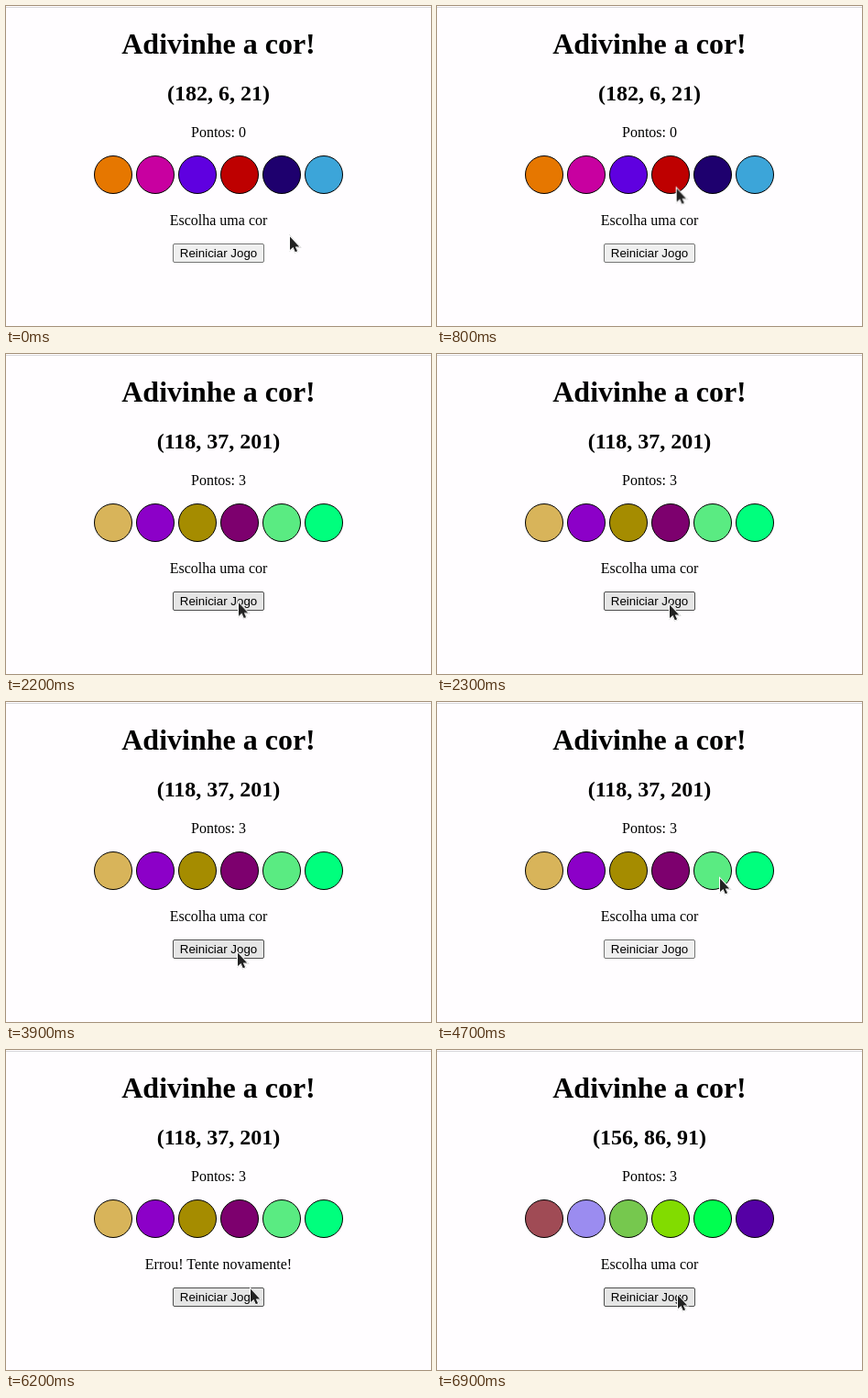
Animation of 464 by 349 pixels, one loop 8 s. Source, as an HTML page:

```html
<!DOCTYPE html>
<html lang="pt-BR">
<head>
<meta charset="utf-8">
<title>Adivinhe a cor!</title>
<style>
html, body { margin: 0; width: 100%; height: 100%; overflow: hidden; background: #fffdff; }
#stage {
  position: relative; width: 464px; height: 349px; overflow: hidden;
  font: 16px/17px "Liberation Serif", "Times New Roman", serif; color: #000;
}
#stage > * { position: absolute; box-sizing: border-box; margin: 0; }
#stage * { animation: 8s step-end infinite; }
.rule { top: 1px; left: 0; width: 100%; height: 1px; background: #d9d8dc; }

.line { left: 0; width: 100%; height: 40px; text-align: center; white-space: nowrap; }
.line span { position: absolute; left: 0; width: 100%; visibility: hidden; }
h1 { top: 23px; font-size: 32px; line-height: 36px; }
h2 { top: 82px; font-size: 24px; line-height: 26px; }
.score { top: 129px; }
.note { top: 225px; }

#stage .dot {
  top: 163px; left: calc(96px + 46px * var(--i)); width: 42px; height: 42px;
  border: 1px solid #000; border-radius: 50%; animation-name: dye;
}
button {
  left: 182px; top: 259px; width: 100px; height: 21px; padding: 0;
  border: 1px solid #767676; border-radius: 2px; background: #efefef; color: #000;
  font: 13.333px/15px "Liberation Sans", Arial, sans-serif; text-align: center;
}
#stage button { animation-name: hover; }
#stage .cursor { left: 0; top: 0; overflow: visible; animation-name: move; }
.cursor path {
  fill: #222; stroke: #fff; stroke-width: 2; paint-order: stroke;
  filter: drop-shadow(0 .5px .6px #0007);
}

#stage .round1 { animation-name: round1; }
#stage .round2 { animation-name: round2; }
#stage .round3 { animation-name: round3; }
#stage .before { animation-name: before; }
#stage .after { animation-name: after; }
#stage .ask { animation-name: ask; }
#stage .right { animation-name: right; }
#stage .wrong { animation-name: wrong; }

@keyframes round1 { 0% { visibility: visible } 27.5%, 100% { visibility: hidden } }
@keyframes round2 { 0% { visibility: hidden } 27.5% { visibility: visible } 86.25%, 100% { visibility: hidden } }
@keyframes round3 { 0% { visibility: hidden } 86.25%, 100% { visibility: visible } }
@keyframes before { 0% { visibility: visible } 15%, 100% { visibility: hidden } }
@keyframes after { 0% { visibility: hidden } 15%, 100% { visibility: visible } }
@keyframes ask {
  0%, 27.5%, 86.25%, 100% { visibility: visible }
  15%, 67.5% { visibility: hidden }
}
@keyframes right { 0% { visibility: hidden } 15% { visibility: visible } 27.5%, 100% { visibility: hidden } }
@keyframes wrong { 0% { visibility: hidden } 67.5% { visibility: visible } 86.25%, 100% { visibility: hidden } }

@keyframes dye {
  0% { background: var(--a) }
  27.5% { background: var(--b) }
  86.25%, 100% { background: var(--c) }
}
@keyframes hover {
  0%, 52.5% { background: #efefef; border-color: #767676 }
  23.75%, 27.5%, 77.5%, 86.25%, 100% { background: #e5e5e5; border-color: #4f4f4f }
  26.25%, 85% { background: #f5f5f5; border-color: #8d8d8d }
}
/* The pointer advances in 100 ms hops. */
@keyframes move {
  0% { transform: translate(309px, 250px) }
  5% { transform: translate(309px, 250px); animation-timing-function: steps(6, start) }
  12.5% { transform: translate(251px, 187px) }
  18.75% { transform: translate(251px, 187px); animation-timing-function: steps(3, start) }
  22.5% { transform: translate(253px, 216px); animation-timing-function: steps(2, start) }
  25% { transform: translate(253px, 265px) }
  26.25% { transform: translate(253px, 265px); animation-timing-function: steps(3, start) }
  30% { transform: translate(253px, 272px) }
  48.75% { transform: translate(252px, 272px) }
  51.25% { transform: translate(252px, 272px); animation-timing-function: steps(7, start) }
  60% { transform: translate(308px, 191px) }
  67.5% { transform: translate(308px, 191px); animation-timing-function: steps(3, start) }
  71.25% { transform: translate(303px, 197px) }
  72.5% { transform: translate(303px, 197px); animation-timing-function: steps(5, start) }
  78.75% { transform: translate(266px, 259px); animation-timing-function: steps(3, start) }
  82.5% { transform: translate(262px, 267px) }
  85% { transform: translate(262px, 267px); animation-timing-function: steps(2, start) }
  87.5%, 100% { transform: translate(262px, 266px) }
}
</style>
</head>
<body>
<div id="stage">
  <div class="rule"></div>
  <h1 class="line">Adivinhe a cor!</h1>
  <h2 class="line">
    <span class="round1">(182, 6, 21)</span>
    <span class="round2">(118, 37, 201)</span>
    <span class="round3">(156, 86, 91)</span>
  </h2>
  <p class="line score">
    <span class="before">Pontos: 0</span>
    <span class="after">Pontos: 3</span>
  </p>
  <div class="dot" style="--i:0; --a:#e67700; --b:#d8b45a; --c:#a04b55"></div>
  <div class="dot" style="--i:1; --a:#c800a0; --b:#8c00c8; --c:#9b8cf0"></div>
  <div class="dot" style="--i:2; --a:#5f00e0; --b:#a58c00; --c:#76c84e"></div>
  <div class="dot" style="--i:3; --a:#be0000; --b:#7d006e; --c:#82dc00"></div>
  <div class="dot" style="--i:4; --a:#1e006e; --b:#5aeb82; --c:#00ff50"></div>
  <div class="dot" style="--i:5; --a:#3ca5d9; --b:#00ff7d; --c:#5500a5"></div>
  <p class="line note">
    <span class="ask">Escolha uma cor</span>
    <span class="right">Acertou!</span>
    <span class="wrong">Errou! Tente novamente!</span>
  </p>
  <button type="button" tabindex="-1">Reiniciar Jogo</button>
  <svg class="cursor" width="16" height="22">
    <path d="M1 1.5V16L4.5 13L6.8 18.2L9.1 17.2L6.8 12.4H11.2Z"/>
  </svg>
</div>
</body>
</html>
```
